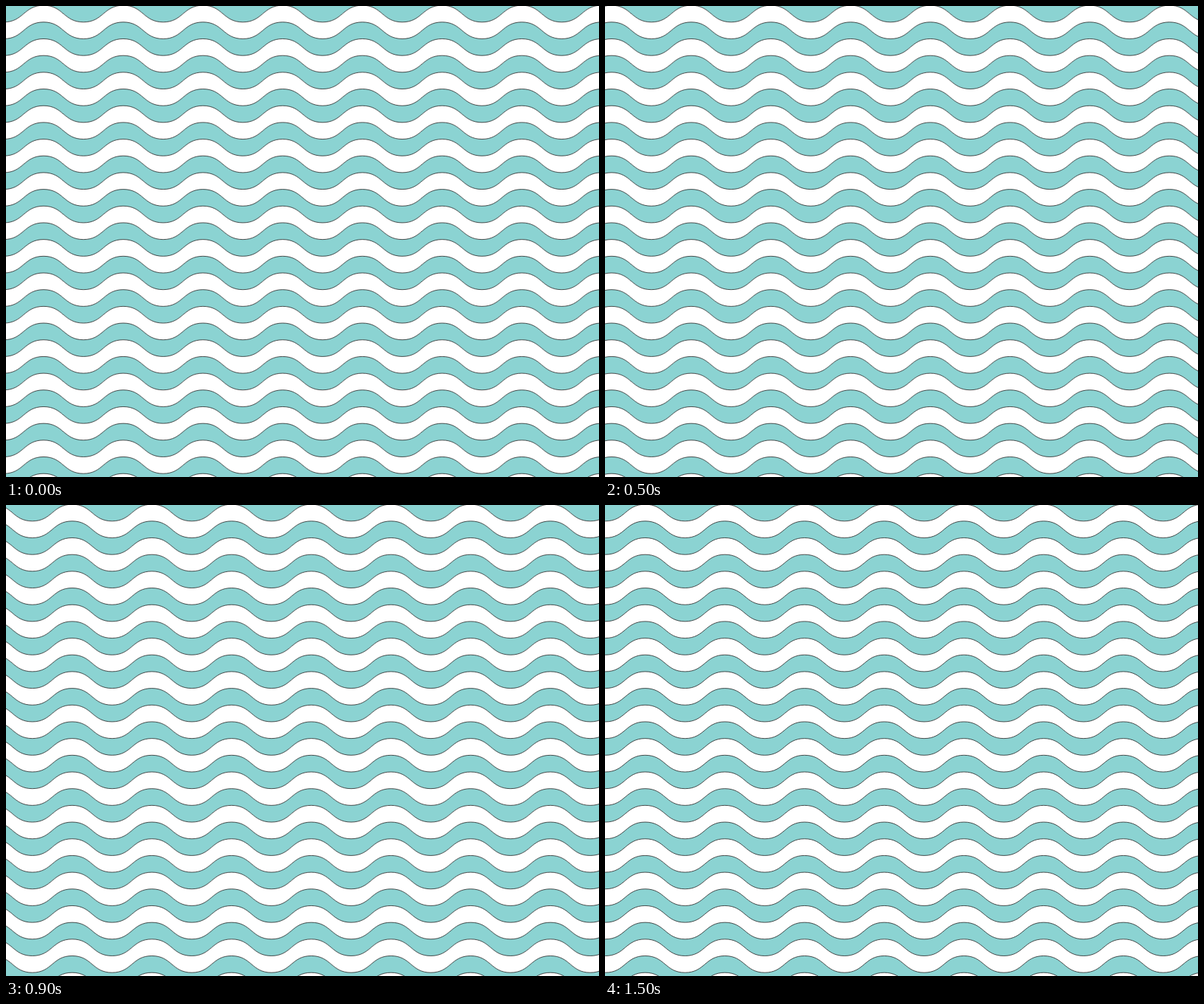
An HTML page that plays this animation: 840x667 px, repeating every 1.7 s.

```html
<!DOCTYPE html>
<html lang="en">
<head>
<meta charset="utf-8">
<title>Waves</title>
<style>
  html, body { margin: 0; width: 100%; height: 100%; overflow: hidden; background: #fff; }
  svg { display: block; width: 840px; height: 667px; }
  #waves { fill: #8bd3d2; stroke: #333; stroke-width: 0.9; animation: drift 1700ms step-end infinite; }

  /* Uneven hand-set steps to the left, together one wavelength per loop */
  @keyframes drift {
    0%     { transform: translateX(53.2px); }
    5.88%  { transform: translateX(37.7px); }
    17.64% { transform: translateX(22.3px); }
    29.41% { transform: translateX(9.2px); }
    41.17% { transform: translateX(-3.9px); }
    52.94% { transform: translateX(-19.2px); }
    64.7%  { transform: translateX(-32.8px); }
    76.47% { transform: translateX(-45px); }
    88.23%, 100% { transform: translateX(-56px); }
  }
</style>
</head>
<body>
<svg viewBox="0 0 840 667"><path id="waves"/></svg>
<script>
  const HALF_WAVE = 56.45;
  const BAND = 23.68;
  const FIRST_CREST = 22.8;
  const LEFT = -4 * HALF_WAVE;
  const WAVES = 11;

  // One full wave, crest to crest; direction 1 runs right, -1 runs left
  const wave = direction => {
    const x = HALF_WAVE * direction;
    const halfWave = dy => `c${x / 2} 0 ${x / 2} ${dy} ${x} ${dy}`;
    return halfWave(BAND) + halfWave(-BAND);
  };

  const band = crest =>
    `M${LEFT} ${crest}${wave(1).repeat(WAVES)}v${BAND}${wave(-1).repeat(WAVES)}z`;

  let shape = '';
  for (let i = -1; i < 14; i++) shape += band(FIRST_CREST + 2 * BAND * i);
  document.getElementById('waves').setAttribute('d', shape);
</script>
</body>
</html>
```
